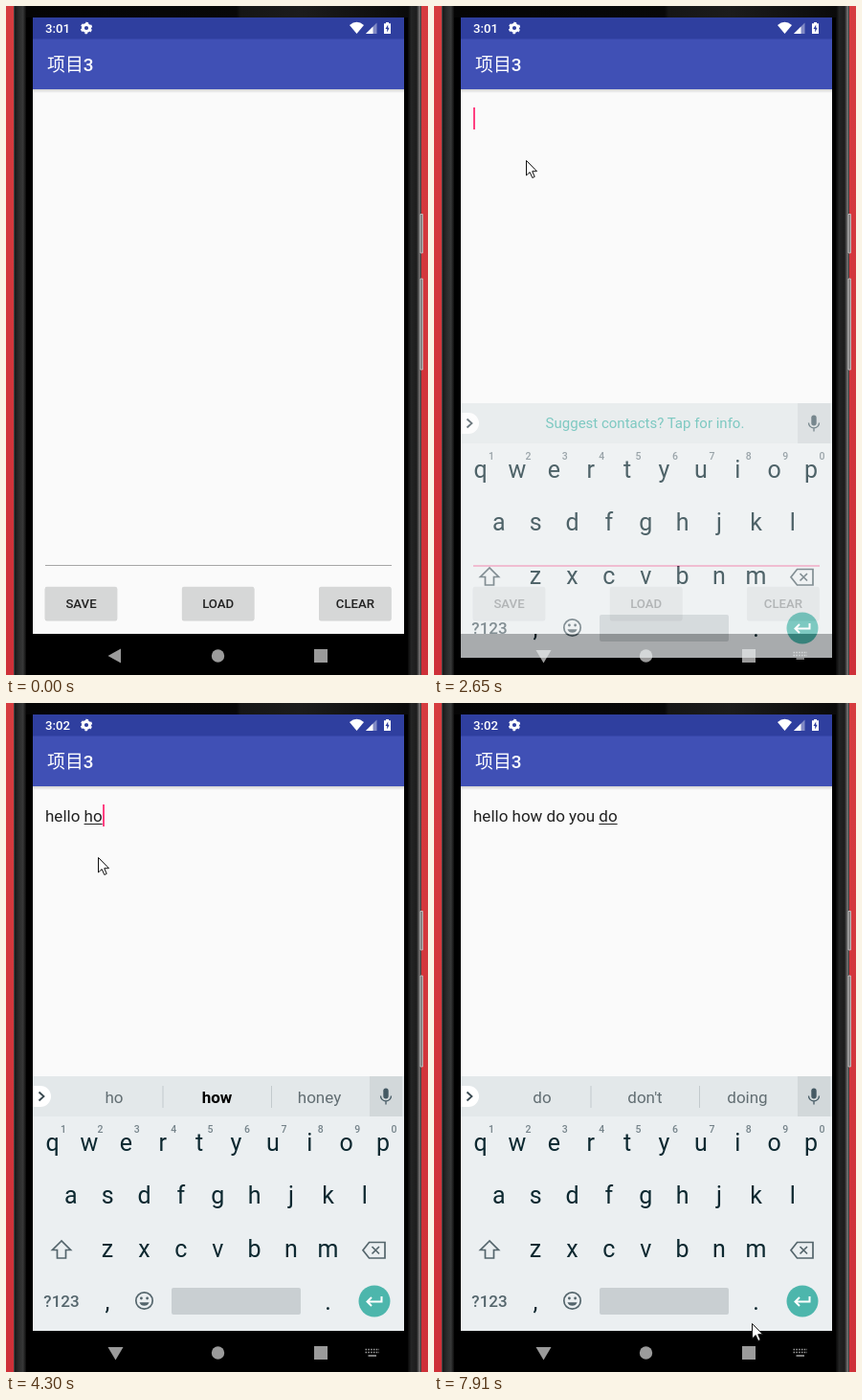
An HTML page that plays this animation: 441x699 px, repeating every 8 s.

```html
<!DOCTYPE html>
<html lang="zh">
<head>
<meta charset="utf-8">
<title>项目3</title>
<style>
  html, body { margin: 0; width: 100%; height: 100%; overflow: hidden; background: #d0343a; }
  svg, #edit { position: absolute; left: 0; top: 0; }
  text, #edit { font-family: Roboto, "Noto Sans CJK SC", sans-serif; }
  text { white-space: pre; }
  .mid text, text.mid { text-anchor: middle; }
  .medium { font-weight: 500; }

  #edit {
    left: 41px; top: 106px; height: 24px;
    font-size: 17px; line-height: 24px; white-space: pre; color: #222;
  }
  #word { text-decoration: underline 1px; text-underline-offset: 2px; text-decoration-skip-ink: none; }
  #caret { position: absolute; top: 0; width: 2px; height: 23px; background: #ff4081; }

  /* a small lead keeps every step clear of its frame boundary */
  #mouse, #keyboard, .before, .after, #focus { animation: 8s step-end -20ms infinite; }
  #mouse { animation-name: point; overflow: visible; }
  #keyboard { animation-name: rise; }
  .before { animation-name: leave; }
  .after { animation-name: enter; }
  #focus { animation-name: focus; }

  @keyframes point {
    0% { transform: translate(361px, 648px); opacity: 0; }
    0.5% { transform: translate(361px, 648px); opacity: 1; animation-timing-function: steps(8); }
    10.5% { transform: translate(130px, 210px); opacity: 1; animation-timing-function: steps(4); }
    15.5% { transform: translate(104px, 179px); opacity: 1; animation-timing-function: steps(5); }
    21.75% { transform: translate(96px, 169px); opacity: 1; animation-timing-function: steps(4); }
    26.75% { transform: translate(96px, 161px); opacity: 1; }
    80.125% { transform: translate(96px, 161px); opacity: 1; animation-timing-function: steps(9); }
    91.375% { transform: translate(276px, 481px); opacity: 1; animation-timing-function: steps(6); }
    98.875%, 100% { transform: translate(332px, 648px); opacity: 1; }
  }
  @keyframes rise {
    0% { transform: translateY(59px); opacity: 0; }
    30.75% { transform: translateY(50px); opacity: .35; }
    32% { transform: translateY(36px); opacity: .56; }
    33.125% { transform: translateY(25px); opacity: .72; }
    34.375% { transform: translateY(15px); opacity: .82; }
    35.625% { transform: translateY(8px); opacity: .9; }
    36.875% { transform: translateY(3px); opacity: .95; }
    38.125% { transform: translateY(1px); opacity: .98; }
    39.375%, 100% { transform: none; opacity: 1; }
  }
  @keyframes leave { 0% { opacity: 1; } 30.75%, 100% { opacity: 0; } }
  @keyframes enter { 0% { opacity: 0; } 30.75%, 100% { opacity: 1; } }
  @keyframes focus { 0% { opacity: 0; } 25%, 100% { opacity: 1; } }
</style>
</head>
<body>
<svg width="441" height="699" viewBox="0 0 441 699">
  <defs>
    <linearGradient id="red" x2="0" y2="1">
      <stop stop-color="#d63c3f"/><stop offset="1" stop-color="#ce3038"/>
    </linearGradient>
    <linearGradient id="left">
      <stop stop-color="#555"/><stop offset=".12" stop-color="#1a1a1a"/>
      <stop offset=".4" stop-color="#2a2b2b"/><stop offset=".75" stop-color="#373838"/>
      <stop offset="1" stop-color="#0c0c0c"/>
    </linearGradient>
    <linearGradient id="right">
      <stop stop-color="#080808"/><stop offset=".25" stop-color="#242525"/>
      <stop offset=".65" stop-color="#1c1c1c"/><stop offset=".88" stop-color="#777"/>
      <stop offset="1" stop-color="#2a2a2a"/>
    </linearGradient>
    <linearGradient id="top">
      <stop stop-color="#050505"/><stop offset=".55" stop-color="#080808"/>
      <stop offset=".56" stop-color="#161616"/><stop offset=".72" stop-color="#1c1c1c"/>
      <stop offset="1" stop-color="#0a0a0a"/>
    </linearGradient>
    <linearGradient id="shade" x2="0" y2="1">
      <stop stop-opacity=".16"/><stop offset="1" stop-opacity="0"/>
    </linearGradient>
  </defs>

  <!-- phone -->
  <path fill="url(#red)" d="M0 0H441V699H0Z"/>
  <path d="M8 0H434V699H8Z"/>
  <path fill="url(#top)" d="M20 0H422V12H20Z"/>
  <path fill="url(#left)" d="M8 0H21V699H8Z"/>
  <path fill="url(#right)" d="M420 0H434V699H420Z"/>
  <path fill="#777" stroke="#cfcfcf" stroke-width=".8" d="M433 217.500H435.500V258H433ZM433 285H435.500V380H433Z"/>

  <!-- app -->
  <path fill="#fafafa" d="M28 12H416V656H28Z"/>
  <path fill="#2f3f9f" d="M28 12H416V35H28Z"/>
  <path fill="#4050b5" d="M28 34.5H416V87H28Z"/>
  <path fill="url(#shade)" d="M28 87H416V91H28Z"/>
  <g fill="#fff">
    <text id="clock" class="medium" x="41" y="28" font-size="13.2">3:01</text>
    <text x="43" y="68" font-size="18.9">项目<tspan class="medium">3</tspan></text>
    <circle cx="84" cy="23" r="3.6" fill="none" stroke="#fff" stroke-width="3"/>
    <circle cx="84" cy="23" r="5.4" fill="none" stroke="#fff" stroke-width="1.6"
            stroke-dasharray="2.8 2.855" stroke-dashoffset="-1.43"/>
    <path d="M359 20Q366.500 13.500 374 20L366.500 29Z"/>
    <path opacity=".4" d="M387.500 17.500V29H376Z"/>
    <path d="M383.500 21.500V29H376Z"/>
    <path d="M397 17H400V18.200H402V29H395V18.200H397Z"/>
    <path fill="#2f3f9f" d="M399.200 19.500L396.500 24H398.200V27.500L400.700 22.800H399.200Z"/>
  </g>
  <path fill="#a6a6a6" d="M41 584H403V585H41Z"/>
  <path id="focus" fill="#ff4081" d="M41 584H403V586H41Z"/>
  <g id="buttons" class="mid medium" font-size="13.2"></g>

  <!-- navigation bar -->
  <path d="M28 656H416V699H28Z"/>
  <g fill="#9b9b9b">
    <path class="before" d="M106.500 679L120 671.500V686.500Z"/>
    <path class="after" d="M106.500 673H122.500L114.500 686.500Z"/>
    <circle cx="221.500" cy="679" r="6.700"/>
    <path d="M322 672H336V686H322Z"/>
    <g class="after" fill="none" stroke="#9b9b9b" stroke-width="1.600">
      <path stroke-dasharray="1.600 1.200" d="M375.500 675.500H390M375.500 678.500H390"/>
      <path d="M378.500 682H387"/>
    </g>
  </g>

  <!-- keyboard -->
  <g id="keyboard">
    <path fill="#ebeff1" d="M28 390H416V656H28Z"/>
    <path fill="#e3e8ea" d="M28 390H416V432H28Z"/>
    <path fill="#d2d8da" d="M380 390H414V432H380Z"/>
    <path fill="#fff" d="M28 400H36A11 11 0 0 1 36 422H28Z"/>
    <g fill="none" stroke="#37474f" stroke-width="1.800">
      <path d="M34.500 406.500L39.500 411L34.500 415.500"/>
      <path stroke="#455a64" stroke-width="1.300" d="M391.500 410.500A5.500 5.500 0 0 0 402.500 410.500M397 416V419.500"/>
    </g>
    <rect x="394.300" y="402.500" width="5.400" height="11" rx="2.700" fill="#455a64"/>
    <text id="tip" class="mid" x="220.500" y="416" font-size="15" fill="#4db6ac">Suggest contacts? Tap for info.</text>
    <g id="chips" class="mid" font-size="17">
      <path stroke="#c3cacd" d="M164 400V423M277.500 400V423"/>
      <text x="113" y="417.500"></text><text x="220.500" y="417.500"></text><text x="327.500" y="417.500"></text>
    </g>
    <g id="keys" class="mid" font-size="25" fill="#0c2830"></g>
    <g id="digits" class="mid medium" font-size="10.500" fill="#75838a"></g>
    <text class="mid medium" x="58" y="631" font-size="17" fill="#54656c">?123</text>
    <rect x="173" y="611" width="135" height="28" rx="2" fill="#c9cfd2"/>
    <g fill="none" stroke="#54656c" stroke-width="1.700">
      <path d="M58 562L48.500 571.500H53.500V580H62.500V571.500H67.500Z"/>
      <path d="M379.500 563.500H396V580H379.500L373 571.750ZM382.500 568L390 575.500M390 568L382.500 575.500"/>
      <circle cx="144.500" cy="624.500" r="8.700"/>
    </g>
    <g fill="#54656c">
      <circle cx="141.400" cy="622" r="1.400"/>
      <circle cx="147.600" cy="622" r="1.400"/>
      <path d="M139.500 626.200A5.300 5.300 0 0 0 149.500 626.200Z"/>
    </g>
    <circle cx="385" cy="625" r="16.500" fill="#4db6ac"/>
    <path fill="none" stroke="#fff" stroke-width="2" d="M392.500 620V625.500H377.500M382 621L377.500 625.500L382 630"/>
  </g>
</svg>

<div id="edit"><span id="done"></span><span id="word"></span><span id="caret"></span></div>

<svg id="mouse" width="14" height="20">
  <path fill="#fff" stroke="#111" d="M.5.500V16L4.200 12.600L6.800 18.500L9.200 17.400L6.700 11.700H11.500Z"/>
</svg>

<script>
  const $ = id => document.getElementById(id);

  function add(parent, tag, attrs, label = '') {
    const el = document.createElementNS('http://www.w3.org/2000/svg', tag);
    for (const name in attrs) el.setAttribute(name, attrs[name]);
    el.textContent = label;
    parent.append(el);
  }

  ['SAVE', 'LOAD', 'CLEAR'].forEach((label, i) => {
    const x = 40.7 + i * 143.2, box = { width: 75.5, height: 35, rx: 2 };
    add($('buttons'), 'rect', { ...box, x, y: 607.6, fill: '#000', opacity: .16 });
    add($('buttons'), 'rect', { ...box, x, y: 606.8, fill: '#d6d7d7' });
    add($('buttons'), 'text', { x: x + 37.8, y: 629, fill: '#222' }, label);
  });

  function row(letters, x, y) {
    [...letters].forEach((c, i) => add($('keys'), 'text', { x: x + i * 38.4, y }, c));
  }
  row('qwertyuiop', 48.5, 467.5);
  row('asdfghjkl', 67.7, 523);
  row('zxcvbnm', 106, 578.5);
  row(',', 106, 633.7);
  row('.', 336.5, 633.7);
  [...'1234567890'].forEach((c, i) => add($('digits'), 'text', { x: 60 + i * 38.4, y: 449 }, c));

  // time, typed text, suggestions (a star marks the bold one)
  const typing = [
    [0, '', ''],
    [3480, 'h', 'h|*how|hey'],
    [3600, 'he', 'he|hey|her'],
    [3720, 'hel', 'hel|*help|hello'],
    [3840, 'hell', 'hell|hello|hells'],
    [3960, 'hello', 'hello|hellos|hello!'],
    [4080, 'hello ', 'there|I|my'],
    [4200, 'hello h', 'h|*how|hi'],
    [4300, 'hello ho', 'ho|*how|honey'],
    [4470, 'hello how', 'how|however|how\'s'],
    [4570, 'hello how ', 'are|is|was'],
    [4680, 'hello how d', 'd|*do|did'],
    [4780, 'hello how do', 'do|does|don\'t'],
    [4880, 'hello how do ', 'you|I|we'],
    [4980, 'hello how do y', 'y|*you|your'],
    [5090, 'hello how do yo', 'yo|*you|your'],
    [5200, 'hello how do you', 'you|your|you\'re'],
    [5280, 'hello how do you ', 'you|you feel|you know'],
    [5460, 'hello how do you d', 'd|*do|did'],
    [5540, 'hello how do you do', 'do|don\'t|doing']
  ];
  const blinks = [2000, 2760, 2940, 5780, 5970, 6150, 6350, 6510, 6710, 6910, 7110, 7310];

  const chips = [...$('chips').querySelectorAll('text')];
  const clip = $('mouse').getAnimations()[0];
  const lead = 20;
  let shown;

  function type(step) {
    const [, text, words] = step;
    const cut = text.lastIndexOf(' ') + 1;
    $('done').textContent = text.slice(0, cut);
    $('word').textContent = text.slice(cut);
    $('tip').style.display = text ? 'none' : '';
    $('chips').style.display = text ? '' : 'none';
    words.split('|').forEach((word, i) => {
      const bold = word[0] === '*';
      chips[i].textContent = word.replace('*', '');
      chips[i].style.fontWeight = bold ? 700 : 400;
      chips[i].style.fill = bold ? '#000' : '#626e73';
    });
  }

  function draw() {
    const t = ((clip.currentTime || 0) + lead) % 8000;
    const step = typing.findLast(s => s[0] <= t);
    if (step !== shown) type(shown = step);
    const flips = blinks.filter(b => b <= t).length;
    $('caret').style.visibility = flips % 2 ? 'visible' : 'hidden';
    $('clock').textContent = t < 3800 ? '3:01' : '3:02';
    requestAnimationFrame(draw);
  }
  draw();
</script>
</body>
</html>
```
